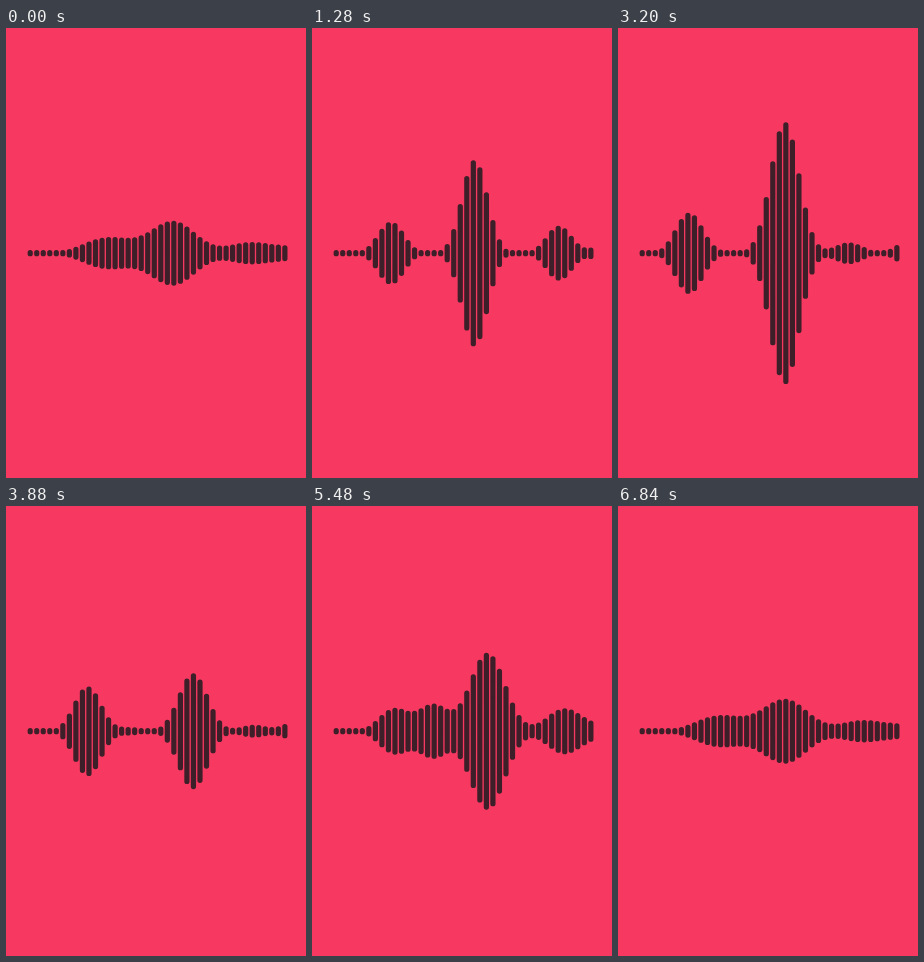
Write an HTML page with a canvas that moves like this. It is 300 px wide and 450 px high and loops after 6880 ms.

```html
<!DOCTYPE html>
<html lang="en">
<head>
<meta charset="utf-8">
<title>Sound wave</title>
<style>
html, body { margin: 0; width: 100%; height: 100%; overflow: hidden; background: #f73860; }
canvas { display: block; }
</style>
</head>
<body>
<canvas id="stage" width="300" height="450"></canvas>
<script>
const LOOP = 6840, PERIOD = 6880, STEP = 40;
const BARS = 40, FIRST_X = 24.2, GAP = 6.53, MID_Y = 225.2, WIDTH = 5.2, MIN_HALF = 3.1;
const ctx = document.getElementById('stage').getContext('2d');

// Smooth looping curve through the values at the given times, without overshoot.
function curve(times, values) {
  const n = times.length;
  const time = i => times[(i + n) % n] + Math.floor(i / n) * LOOP;
  const value = i => values[(i + n) % n];
  const rise = i => (value(i + 1) - value(i)) / (time(i + 1) - time(i));
  const slope = i => {
    const a = rise(i - 1), b = rise(i);
    return a * b > 0 ? 2 * a * b / (a + b) : 0;
  };
  return t => {
    const i = times.findLastIndex(start => start <= t);
    const d = time(i + 1) - time(i), u = (t - time(i)) / d, w = 1 - u;
    return value(i) * (1 + 2 * u) * w * w + value(i + 1) * (3 - 2 * u) * u * u
      + d * u * w * (slope(i) * w - slope(i + 1) * u);
  };
}

// Positions and widths are counted in bars, heights in pixels from the middle line.
const pose = (...values) => curve([0, 1280, 2400, 3880, 4880, 6160], values);
const spread = pose(4.8, 2.75, 3.05, 3.1, 3.75, 3.8);
const main = pose(21.9, 21.2, 17.9, 24.95, 25, 21);
const loudness = curve([0, 960, 2500, 3240, 3880, 4880, 5820, 6160],
  [32, 99, 50, 132, 58, 30.5, 99, 71.5]);
const left = pose(11.6, 8.4, 5.65, 8.8, 9.5, 8.1);
const leftSpread = pose(5, 2.8, 2.9, 2.9, 4, 2.2);
const leftHeight = pose(15, 31.5, 34, 45, 16.5, 30);
const right = pose(33.8, 34.15, 29.45, 34.3, 36.4, 33.2);
const rightHeight = pose(11, 27.5, 19.7, 6.4, 13, 31.5);
const bridgeHeight = pose(2, 0, 0, 4, 27.5, 23);
const edgeHeight = pose(5, 6, 11.5, 8, 3, 5);

const bell = (x, centre, width, height) => height * Math.exp(-(((x - centre) / width) ** 2));

function draw(t) {
  const w = spread(t), l = left(t), m = main(t);
  const lobes = [
    [l, leftSpread(t), leftHeight(t)],
    [l + 0.42 * (m - l), 0.85 * w, bridgeHeight(t)],
    [m, w, loudness(t)],
    [right(t), w, rightHeight(t)],
    [BARS, 0.7 * w, edgeHeight(t)]
  ];
  ctx.fillStyle = '#f73860';
  ctx.fillRect(0, 0, 300, 450);
  ctx.strokeStyle = '#3c1f28';
  ctx.lineWidth = WIDTH;
  ctx.lineCap = 'round';
  ctx.beginPath();
  for (let i = 0; i < BARS; i++) {
    const height = lobes.reduce((sum, lobe) => sum + bell(i, ...lobe), 0);
    const half = Math.max(MIN_HALF, height) - WIDTH / 2;
    const x = FIRST_X + i * GAP;
    ctx.moveTo(x, MID_Y - half);
    ctx.lineTo(x, MID_Y + half);
  }
  ctx.stroke();
}

const start = performance.now();
function tick() {
  const t = (performance.now() - start) % PERIOD;
  draw(Math.floor(t / STEP) * STEP % LOOP);
  requestAnimationFrame(tick);
}
tick();
</script>
</body>
</html>
```
